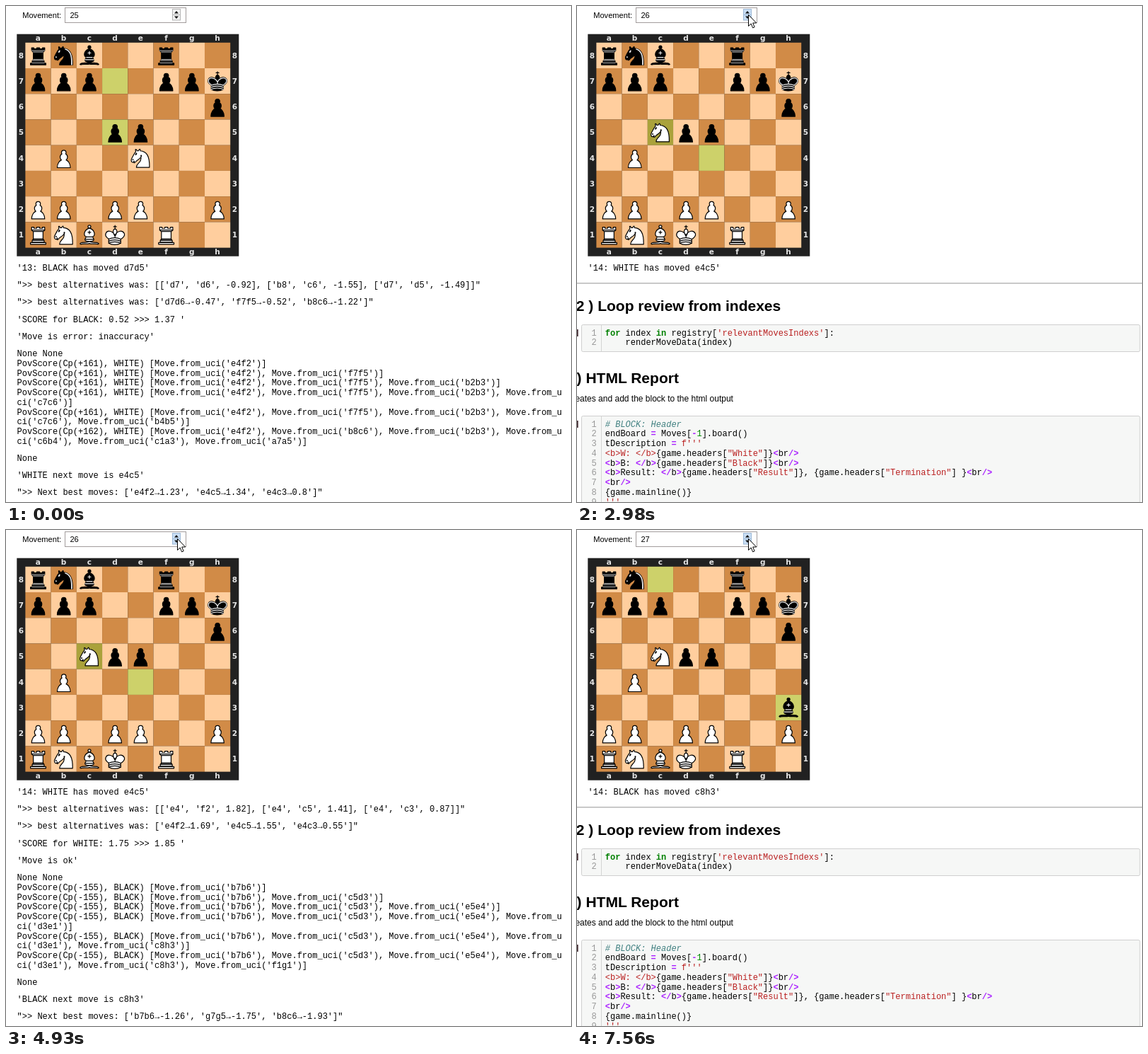
These frames come from a looping animation (799 by 701 pixels, 8 s). An HTML page:

```html
<!DOCTYPE html>
<html lang="en">
<head>
<meta charset="utf-8">
<title>Chess review notebook</title>
<style>
html, body { margin: 0; width: 100%; height: 100%; overflow: hidden; background: #fff; }
svg { display: block; width: 799px; height: 701px; }
text { white-space: pre; }
.mono { font: 12px 'Liberation Mono', 'Courier New', monospace; }
.ui { font: 11.1px 'Liberation Sans', Arial, sans-serif; }
.body { font: 12px 'Liberation Sans', Arial, sans-serif; }
.head { font: bold 21px 'Liberation Sans', Arial, sans-serif; }
.coord { font: bold 10.5px 'DejaVu Sans', sans-serif; fill: #e5e5e5; text-anchor: middle; }
.num { fill: #999; text-anchor: end; }
.key { fill: #008000; font-weight: bold; }
.str { fill: #ba2121; }
.com { fill: #408080; font-style: italic; }
.op { fill: #aa22ff; font-weight: bold; }
.digit { fill: #008800; }
</style>
</head>
<body>
<svg viewBox="0 0 799 701">
  <rect width="799" height="701" fill="#fff"/>
  <text class="ui" x="23.2" y="17">Movement:</text>
  <rect x="83.5" y="2.5" width="171" height="21" fill="#fff" stroke="#a29c9c"/>
  <text class="ui" id="count" x="90.4" y="17"></text>
  <g id="spin" stroke="#b4b4b4">
    <rect x="235.5" y="4.5" width="11" height="8"/>
    <rect x="235.5" y="12.5" width="11" height="7.5"/>
    <path d="M238 10.5h6l-3-3.5zM238 14.5h6l-3 3.5z" fill="#111" stroke="none"/>
  </g>
  <g id="board" transform="translate(15.3 39.7) scale(.8051)"></g>
  <g id="coords"></g>
  <g id="log" class="mono"></g>
  <g id="tail"></g>
  <path id="cursor" d="M0 0V16L3.7 12.5 6.1 18.4 8.6 17.3 6.2 11.5H11.2Z" fill="#fff" stroke="#000"/>
</svg>
<script>
const LOOP = 8000, LINE = 13.75, PARA = 24.2, TOP = 374;
const $ = id => document.getElementById(id);
const esc = s => s.replace(/&/g, '&amp;').replace(/</g, '&lt;');
const text = (x, y, s, cls = '') => `<text x="${x}" y="${y}" class="${cls}">${esc(s)}</text>`;

// Pieces on a 45-unit square: body, then detail lines
const PIECES = {
  p: ['M22.5 9c-2.21 0-4 1.79-4 4 0 .89.29 1.71.78 2.38C17.33 16.5 16 18.59 16 21c0 2.03.94 3.84 2.41 5.03-3 1.06-7.41 5.55-7.41 13.47h23c0-7.92-4.41-12.41-7.41-13.47 1.47-1.19 2.41-3 2.41-5.03 0-2.41-1.33-4.5-3.28-5.62.49-.67.78-1.49.78-2.38 0-2.21-1.79-4-4-4z'],
  n: ['M22 10c10.5 1 16.5 8 16 29H15c0-9 10-6.5 8-21M24 18c.38 2.91-5.55 7.37-8 9-3 2-2.82 4.34-5 4-1.04-.94 1.41-3.04 0-3-1 0 .19 1.23-1 2-1 0-4 1-4-4 0-2 6-12 6-12s1.89-1.9 2-3.5c-.73-1-.5-2-.5-3 1-1 3 2.5 3 2.5h2s.78-2 2.5-3c1 0 1 3 1 3',
      'M9.5 25.5a.5.5 0 1 1-1 0 .5.5 0 1 1 1 0zM14.93 15.75a.5 1.5 30 1 1-.86-.5.5 1.5 30 1 1 .86.5z'],
  b: ['M9 36c3.39-.97 10.11.43 13.5-2 3.39 2.43 10.11 1.03 13.5 2 0 0 1.65.54 3 2-.68.97-1.65.99-3 .5-3.39-.97-10.11.46-13.5-1-3.39 1.46-10.11.03-13.5 1-1.35.49-2.32.47-3-.5 1.35-1.94 3-2 3-2zM15 32c2.5 2.5 12.5 2.5 15 0 .5-1.5 0-2 0-2 0-2.5-2.5-4-2.5-4 5.5-1.5 6-11.5-5-15.5-11 4-10.5 14-5 15.5 0 0-2.5 1.5-2.5 4 0 0-.5.5 0 2zM25 8a2.5 2.5 0 1 1-5 0 2.5 2.5 0 1 1 5 0z',
      'M17.5 26h10M15 30h15m-7.5-14.5v5M20 18h5'],
  r: ['M9 39h27v-3H9zM12 36v-4h21v4zM11 14V9h4v2h5V9h5v2h5V9h4v5l-3 3v12.5l1.5 2.5h-20l1.5-2.5V17z',
      'M12 35.5h21M13 31.5h19M14 29.5h17M14 16.5h17M11 14h23'],
  k: ['M22.5 11.63V6M20 8h5M22.5 25s4.5-7.5 3-10.5c0 0-1-2.5-3-2.5s-3 2.5-3 2.5c-1.5 3 3 10.5 3 10.5M11.5 37c5.5 3.5 15.5 3.5 21 0v-7s9-4.5 6-10.5c-4-6.5-13.5-3.5-16 4V27v-3.5c-3.5-7.5-13-10.5-16-4-3 6 5 10 5 10z',
      'M11.5 30c5.5-3 15.5-3 21 0m-21 3.5c5.5-3 15.5-3 21 0m-21 3.5c5.5-3 15.5-3 21 0']
};
const MANE = 'M24.55 10.4l-.45 1.45.5.15c3.15 1 5.65 2.49 7.9 6.75S35.75 29.06 35.25 39l-.05.5h2.25l.05-.5c.5-10.06-.88-16.85-3.25-21.34-2.37-4.49-5.79-6.64-9.19-7.16z';
const CROWN = 'M32 29.5s8.5-4 6.03-9.65C34.15 14 25 18 22.5 24.5v2.1-2.1C20 18 9.9 14 7 19.85c-2.5 5.65 4.85 9 4.85 9';

function piece(ch, x, y) {
  const kind = ch.toLowerCase(), black = ch === kind;
  const [body, lines = ''] = PIECES[kind];
  const ink = black ? '#ececec' : '#000';
  const width = kind === 'r' && black ? 1 : 1.5;
  let out = `<path d="${body}" fill="${black ? '#000' : '#fff'}"/>`;
  out += `<path d="${lines}" fill="none" stroke="${ink}" stroke-width="${width}"/>`;
  if (black && kind === 'n') out += `<path d="${MANE}" fill="${ink}" stroke="none"/>`;
  if (black && kind === 'k') out += `<path d="${CROWN}" fill="none" stroke="${ink}"/>`;
  return `<g transform="translate(${x} ${y})" stroke="#000" stroke-width="1.5" stroke-linecap="round" stroke-linejoin="round">${out}</g>`;
}

function boardSvg({ fen, marks }) {
  let squares = '<rect width="390" height="390" fill="#212121"/>', men = '';
  fen.split('/').forEach((row, r) => {
    const cells = row.replace(/\d/g, n => '.'.repeat(n));
    [...cells].forEach((ch, c) => {
      const x = 15 + c * 45, y = 15 + r * 45, dark = (r + c) % 2;
      const marked = marks.includes('abcdefgh'[c] + (8 - r));
      const fill = marked ? ['#cdd16a', '#aaa23b'][dark] : ['#ffce9e', '#d18b47'][dark];
      squares += `<rect x="${x}" y="${y}" width="45" height="45" fill="${fill}"/>`;
      if (ch !== '.') men += piece(ch, x, y);
    });
  });
  return squares + men;
}

function coordsSvg() {
  let out = '';
  for (let i = 0; i < 8; i++) {
    const p = i * 36.23;
    for (const y of [48.6, 351]) out += text(45.4 + p, y, 'abcdefgh'[i], 'coord');
    for (const x of [21.3, 323.4]) out += text(x, 73.6 + p, String(8 - i), 'coord');
  }
  return out;
}

const BOARDS = [
  { fen: 'rnb2r2/ppp2ppk/7p/3pp3/1P2N3/8/PP1PP2P/RNBK1R2', marks: ['d7', 'd5'] },
  { fen: 'rnb2r2/ppp2ppk/7p/2Npp3/1P6/8/PP1PP2P/RNBK1R2', marks: ['c5', 'e4'] },
  { fen: 'rn3r2/ppp2ppk/7p/2Npp3/1P6/7b/PP1PP2P/RNBK1R2', marks: ['c8', 'h3'] }
];

// Engine lines, wrapped at the width of the output cell
function engine(side, steps) {
  const lines = ['None None'];
  for (const [cp, moves] of steps) {
    const list = moves.map(m => `Move.from_uci('${m}')`).join(', ');
    lines.push(...`PovScore(Cp(${cp}), ${side}) [${list}]`.match(/.{1,107}/g));
  }
  return lines;
}
const prefixes = (cp, moves, n) =>
  Array.from({ length: n }, (_, i) => [cp, moves.slice(0, i + 1)]);

const LOGS = [
  [
    "'13: BLACK has moved d7d5'",
    `">> best alternatives was: [['d7', 'd6', -0.92], ['b8', 'c6', -1.55], ['d7', 'd5', -1.49]]"`,
    `">> best alternatives was: ['d7d6→-0.47', 'f7f5→-0.52', 'b8c6→-1.22']"`,
    "'SCORE for BLACK: 0.52 >>> 1.37 '",
    "'Move is error: inaccuracy'",
    engine('WHITE', [
      ...prefixes('+161', ['e4f2', 'f7f5', 'b2b3', 'c7c6', 'b4b5'], 5),
      ['+162', ['e4f2', 'b8c6', 'b2b3', 'c6b4', 'c1a3', 'a7a5']]
    ]),
    'None',
    "'WHITE next move is e4c5'",
    `">> Next best moves: ['e4f2→1.23', 'e4c5→1.34', 'e4c3→0.8']"`
  ],
  [
    "'14: WHITE has moved e4c5'",
    `">> best alternatives was: [['e4', 'f2', 1.82], ['e4', 'c5', 1.41], ['e4', 'c3', 0.87]]"`,
    `">> best alternatives was: ['e4f2→1.69', 'e4c5→1.55', 'e4c3→0.55']"`,
    "'SCORE for WHITE: 1.75 >>> 1.85 '",
    "'Move is ok'",
    engine('BLACK', prefixes('-155', ['b7b6', 'c5d3', 'e5e4', 'd3e1', 'c8h3', 'f1g1'], 6)),
    'None',
    "'BLACK next move is c8h3'",
    `">> Next best moves: ['b7b6→-1.26', 'g7g5→-1.75', 'b8c6→-1.93']"`
  ],
  ["'14: BLACK has moved c8h3'"]
];

// Draws the paragraphs and returns the last baseline
function drawLog(paras) {
  let y = TOP - PARA, out = '';
  for (const para of paras) {
    y += PARA;
    [].concat(para).forEach((line, i) => {
      if (i) y += LINE;
      out += text(15.6, y, line);
    });
  }
  $('log').innerHTML = out;
  return y;
}

const TOKEN = /(?<com>#.*)|(?<str>f?'''|'[^']*'|"[^"]*")|(?<key>\b(?:for|in)\b)|(?<digit>\d+)|(?<op>[<>=\/-]+)/g;
const span = (cls, s) => `<tspan class="${cls}">${esc(s)}</tspan>`;

function highlight(line) {
  let out = '', at = 0;
  for (const m of line.matchAll(TOKEN)) {
    const cls = Object.keys(m.groups).find(k => m.groups[k]);
    out += esc(line.slice(at, m.index)) + span(cls, m[0]);
    at = m.index + m[0].length;
  }
  return out + esc(line.slice(at));
}

function cell(y, h, lines) {
  let out = `<rect x="6.5" y="${y}" width="789.5" height="${h}" rx="2" fill="#f6f7f6" stroke="#cfcfcf"/>
    <path d="M34.5 ${y}v${h}" stroke="#d4d4d4"/><rect y="${y + 6.5}" width="1.6" height="10" fill="#3a2228"/>`;
  lines.forEach((line, i) => {
    const base = y + 15.2 + i * LINE;
    const [, lead, rest] = line.match(/^(<b>W: <\/b>)?(.*)$/);
    out += text(27.8, base, String(i + 1), 'mono num');
    out += `<text class="mono" x="39.8" y="${base}">${lead ? span('str', lead) : ''}${highlight(rest)}</text>`;
  });
  return out;
}

$('coords').innerHTML = coordsSvg();
$('tail').innerHTML =
  '<rect y="391" width="799" height="1.6" fill="#bcbcbc"/>' +
  text(-1.2, 431.3, '2 ) Loop review from indexes', 'head') +
  cell(450.5, 38, [
    "for index in registry['relevantMovesIndexs']:",
    '    renderMoveData(index)'
  ]) +
  text(-0.4, 533, ') HTML Report', 'head') +
  text(-2.6, 559, 'eates and add the block to the html output', 'body') +
  cell(579.5, 400, [
    '# BLOCK: Header',
    'endBoard = Moves[-1].board()',
    "tDescription = f'''",
    '<b>W: </b>{game.headers["White"]}<br/>',
    '<b>B: </b>{game.headers["Black"]}<br/>',
    '<b>Result: </b>{game.headers["Result"]}, {game.headers["Termination"] }<br/>',
    '<br/>',
    '{game.mainline()}',
    "'''"
  ]);

// Scenes: start, board and log index, paragraphs shown
const SCENES = [
  [0, 0, 9], [2980, 1, 1], [4290, 1, 2], [4600, 1, 5],
  [4690, 1, 8], [4930, 1, 9], [7490, 2, 1]
];
// Pointer: time, x, y
const PATH = [
  [440, 736, 684], [670, 470, 330], [900, 225, 70], [1055, 180, 14],
  [1210, 232, 2], [1290, 233, 3], [1520, 238, 10], [1750, 240, 13],
  [2060, 241, 13], [2360, 242, 12]
];

function pointer(t) {
  const q = 440 + Math.floor((t - 440 + 2) / 77) * 77;
  const i = PATH.findIndex(p => p[0] > q);
  if (i < 0) return PATH[PATH.length - 1].slice(1);
  const [t0, x0, y0] = PATH[Math.max(0, i - 1)], [t1, x1, y1] = PATH[i];
  const k = Math.max(0, (q - t0) / (t1 - t0));
  return [Math.round(x0 + (x1 - x0) * k), Math.round(y0 + (y1 - y0) * k)];
}

let shown = null, shownBoard = null;
function draw(t) {
  const scene = SCENES.findLast(s => t >= s[0]);
  if (scene !== shown) {
    const [, n, paras] = scene;
    if (n !== shownBoard) $('board').innerHTML = boardSvg(BOARDS[n]);
    const last = drawLog(LOGS[n].slice(0, paras));
    $('tail').setAttribute('transform', `translate(0 ${last - TOP})`);
    shown = scene;
    shownBoard = n;
  }
  $('count').textContent = t < 2590 ? 25 : t < 6950 ? 26 : 27;
  const [x, y] = pointer(t);
  $('cursor').setAttribute('transform', `translate(${x + .5} ${y + .5})`);
  $('cursor').style.display = t < 440 ? 'none' : '';
  const hover = t >= 440 && x >= 235 && x <= 247 && y >= 4 && y <= 20;
  $('spin').setAttribute('fill', hover ? '#c9def5' : '#f3f3f3');
  $('spin').setAttribute('stroke', hover ? '#9db8d6' : '#b4b4b4');
}

const start = performance.now();
function tick() {
  draw((performance.now() - start) % LOOP);
  requestAnimationFrame(tick);
}
tick();
</script>
</body>
</html>
```
